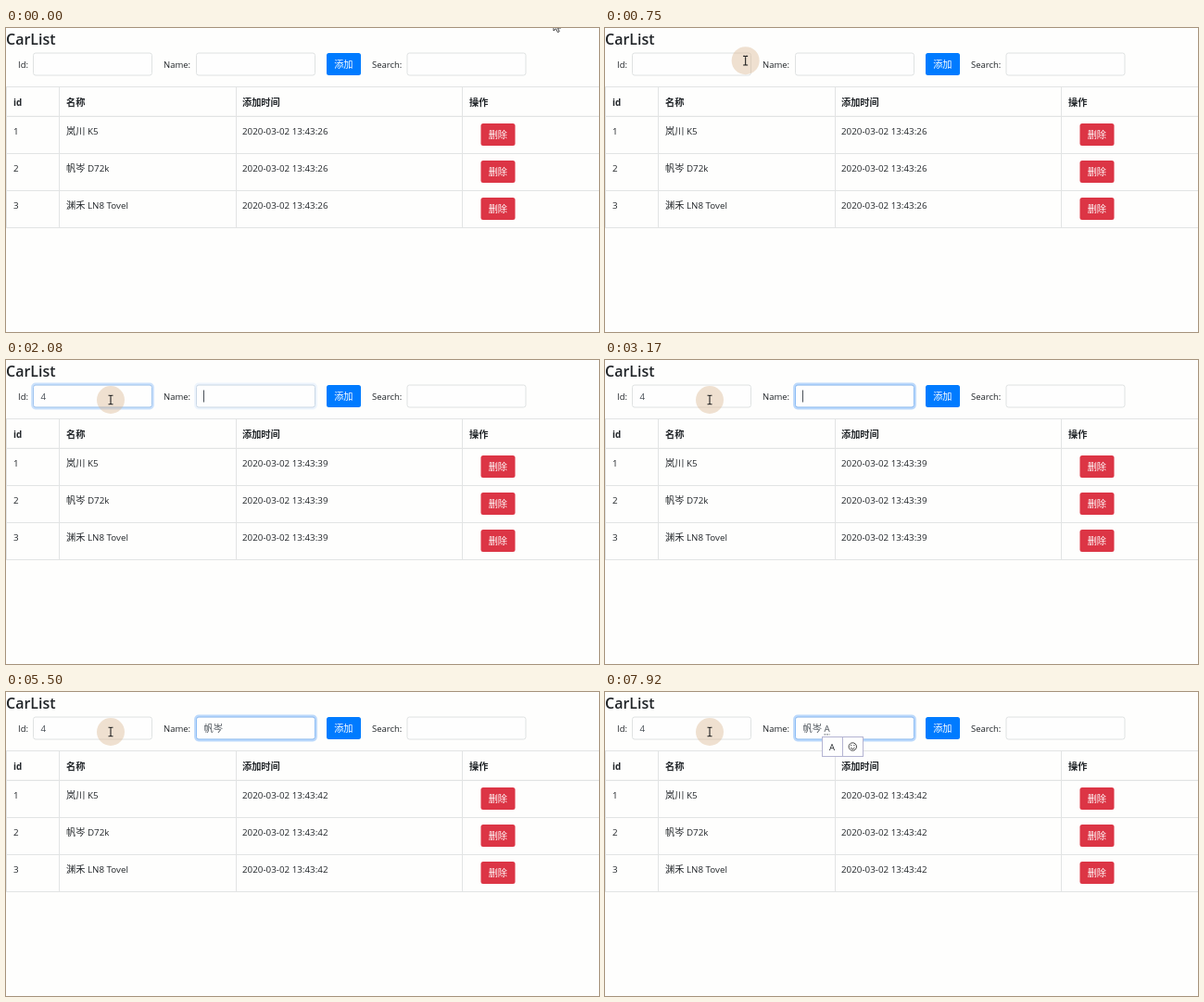
An HTML page that plays this animation: 640x328 px, repeating every 8000 ms.

```html
<!DOCTYPE html>
<html lang="zh-CN">
<head>
<meta charset="utf-8">
<title>CarList</title>
<style>
html, body { margin: 0; width: 100%; height: 100%; overflow: hidden; background: #fefefd; }
svg { display: block; width: 640px; height: 328px; }
text { font: 9.8px "Open Sans", "Noto Sans", "Noto Sans CJK SC", "Noto Sans CJK", sans-serif; fill: #212529; white-space: pre; }
.cn { font-size: 10.2px; }
.title { font-size: 16px; font-weight: 600; }
.head, .head .cn { font-weight: 700; }
.label { font-size: 9.5px; }
.typed { fill: #495057; }
.btn { fill: #fff; }
.num { font-size: 6px; fill: #777; }
.cand, .cand .cn { font-size: 9.5px; }
.on { fill: #fff; }
.grid { stroke: #e2e4e4; fill: none; }
.box { fill: #fefefe; stroke: #dfe2e2; }
.ring { fill: none; stroke: #bcd9fb; stroke-width: 2.4; }
.edge { fill: none; stroke: #8dbdf5; }
.caret { stroke: #495057; }
.ime { fill: #fefefe; stroke: #b4b4d2; }
.face { fill: none; stroke: #333; stroke-width: .9; }
</style>
</head>
<body>
<svg id="stage" viewBox="0 0 640 328"></svg>
<script>
const LOOP = 8000;
const stage = document.getElementById('stage');

function add(tag, attrs, parent = stage) {
  const el = document.createElementNS('http://www.w3.org/2000/svg', tag);
  for (const key in attrs) el.setAttribute(key, attrs[key]);
  parent.appendChild(el);
  return el;
}

// Chinese runs are set slightly larger than Latin ones.
function setText(el, str) {
  el.innerHTML = str.replace(/[\u4e00-\u9fff]+/g, '<tspan class="cn">$&</tspan>');
}

function text(x, y, str, cls = '', parent = stage) {
  const el = add('text', { x, y, class: cls }, parent);
  setText(el, str);
  return el;
}

function button(x, y, str, fill) {
  add('rect', { x, y, width: 37, height: 24, rx: 2.5, fill });
  text(x + 8.2, y + 16.2, str, 'btn');
}

function input(x) {
  add('rect', { x, y: 27, width: 128, height: 24, rx: 2.5, class: 'box' });
  const glow = add('g', { opacity: 0 });
  add('rect', { x: x - 1.2, y: 25.8, width: 130.4, height: 26.4, rx: 3.6, class: 'ring' }, glow);
  add('rect', { x, y: 27, width: 128, height: 24, rx: 2.5, class: 'edge' }, glow);
  return { x: x + 8, glow, label: text(x + 8, 43, '', 'typed') };
}

const show = (el, on) => el.setAttribute('visibility', on ? 'visible' : 'hidden');
const latest = (steps, t) => steps.filter(s => s[0] <= t).pop();
const clamp = v => Math.max(0, Math.min(1, v));

// Form
text(0, 18, 'CarList', 'title');
text(13, 43, 'Id:', 'label');
text(170, 43, 'Name:', 'label');
text(395, 43, 'Search:', 'label');
const idBox = input(29.5);
const nameBox = input(205.5);
input(433);
button(346, 27, '添加', '#007bff');

// Table
add('path', { class: 'grid', d: 'M0 63.5H640M0 135.5H640M0 175.5H640M0 215.5H640M.5 63V216M57.5 63V216M248.5 63V216M492.5 63V216' });
add('path', { class: 'grid', 'stroke-width': 1.3, d: 'M0 95.4H640' });
[[8, 'id'], [65, '名称'], [255, '添加时间'], [500, '操作']].forEach(([x, s]) => text(x, 84, s, 'head'));
const stamps = ['岚川 K5', '帆岑 D72k', '渊禾 LN8 Tovel'].map((name, i) => {
  const y = 115.2 + i * 40;
  text(8, y, String(i + 1));
  text(65, y, name);
  button(512.5, y - 12.2, '删除', '#dc3545');
  return text(255, y, '');
});

// Input method popup
function smiley(x, parent) {
  add('circle', { cx: x, cy: 59, r: 4.2, class: 'face' }, parent);
  add('path', { d: `M${x - 2.2} 60.2q2.2 2.6 4.4 0M${x - 1.6} 57v1.2M${x + 1.6} 57v1.2`, class: 'face' }, parent);
}

function popup(x, words) {
  const g = add('g', { visibility: 'hidden' });
  const frame = add('rect', { x: x + .5, y: 48.5, height: 21, class: 'ime' }, g);
  let end = x;
  if (words.length === 1) {
    text(x + 8, 62.5, words[0], 'cand', g);
    end += 22;
  } else {
    words.forEach((word, i) => {
      const width = /[a-z]/.test(word) ? 46 : 20 + 9.5 * word.length;
      if (!i) add('rect', { x, y: 48, width, height: 22, fill: '#8484b2' }, g);
      text(end + 7.5, 62.3, String(i + 1), i ? 'num' : 'num on', g);
      text(end + 13, 62.5, word, i ? 'cand' : 'cand on', g);
      end += width;
    });
  }
  frame.setAttribute('width', end + 22 - x);
  add('path', { d: `M${end + .5} 48.5v21`, class: 'ime' }, g);
  smiley(end + 11.3, g);
  return g;
}

// start, text, length of the finished part, popup
const typing = [
  [0, '', 0],
  [3750, 'f', 0, popup(212, [...'发放方飞分法风'])],
  [3920, 'fa', 0, popup(212, [...'发法罚乏伐阀筏'])],
  [4000, 'fan', 0, popup(212, ['反', '饭店', '范围', '翻译', '烦恼', '反应', '繁忙'])],
  [4170, "fan'c", 0, popup(212, ['帆岑', '翻唱', '范畴', '饭菜', 'fancy', '反差', '返程'])],
  [4670, '帆岑', 2],
  [5000, '帆岑 ', 3],
  [7000, '帆岑 A', 3, popup(234, ['A'])]
];
const idTyping = [[0, ''], [1830, '4']];
const clock = [[0, 26], [1830, 39], [4670, 42]];
const caretOn = [[1080, 1500], [1830, 2580], [3170, 3670], [3750, 5500], [6000, 6580], [7000, 7500]];

const underline = add('path', { class: 'caret', 'stroke-width': .8, 'stroke-dasharray': '2 .8' });
const caret = add('path', { class: 'caret', d: 'M.5 32.5V45.5' });

// Pointer
const pointer = add('g', {});
const halo = add('circle', { r: 15, fill: '#d9b48c', 'fill-opacity': .4 }, pointer);
const click = add('circle', { fill: 'none', stroke: '#e8503c', 'stroke-width': 2 }, pointer);
const arrow = add('path', { d: 'M0 0V11L2.6 8.6L4.4 12.6L6.2 11.8L4.5 8H8Z', fill: '#fff', stroke: '#333', 'stroke-width': .9 }, pointer);
const beam = add('path', { d: 'M-2.5-4.8H-.8L0-4.2L.8-4.8H2.5M0-4.2V4.2M-2.5 4.8H-.8L0 4.2L.8 4.8H2.5', fill: 'none', stroke: '#222', 'stroke-width': 1.1 }, pointer);

function widthOf(box, str) {
  setText(box.label, str);
  return str ? box.label.getComputedTextLength() : 0;
}

function drawPointer(t) {
  const tick = Math.floor(t / 83.33 + .06);
  const p = clamp(tick / 10);
  const x = 591 - 478 * p ** .8;
  const y = -8 + 51 * p ** 1.585;
  pointer.setAttribute('transform', `translate(${x} ${y})`);
  const overInput = y > 27 && x < 158;
  show(halo, tick > 0);
  show(arrow, !overInput);
  show(beam, overInput);
  const c = (tick - 12) / 5;
  show(click, c >= 0 && c < 1);
  click.setAttribute('r', 4 + 9 * clamp(c));
  click.setAttribute('opacity', .85 - .7 * clamp(c));
}

function draw(t) {
  const [, name, done, list] = latest(typing, t);
  const inName = t >= 2080;
  const seconds = latest(clock, t)[1];
  stamps.forEach(el => setText(el, '2020-03-02 13:43:' + seconds));

  const idWidth = widthOf(idBox, latest(idTyping, t)[1]);
  const start = nameBox.x + widthOf(nameBox, name.slice(0, done));
  const end = nameBox.x + widthOf(nameBox, name);
  const fade = clamp((t - 2040) / 170);
  idBox.glow.setAttribute('opacity', inName ? 1 - fade : clamp((t - 1000) / 150));
  nameBox.glow.setAttribute('opacity', inName ? fade : 0);

  typing.forEach(s => s[3] && show(s[3], s[3] === list));
  show(underline, !!list);
  underline.setAttribute('d', `M${start} 45.9H${end}`);
  show(caret, caretOn.some(([a, b]) => t >= a && t < b));
  caret.setAttribute('transform', `translate(${Math.round(inName ? end - .5 : idBox.x + idWidth)} 0)`);
  drawPointer(t);
}

function frame() {
  draw(performance.now() % LOOP);
  requestAnimationFrame(frame);
}
frame();
</script>
</body>
</html>
```
